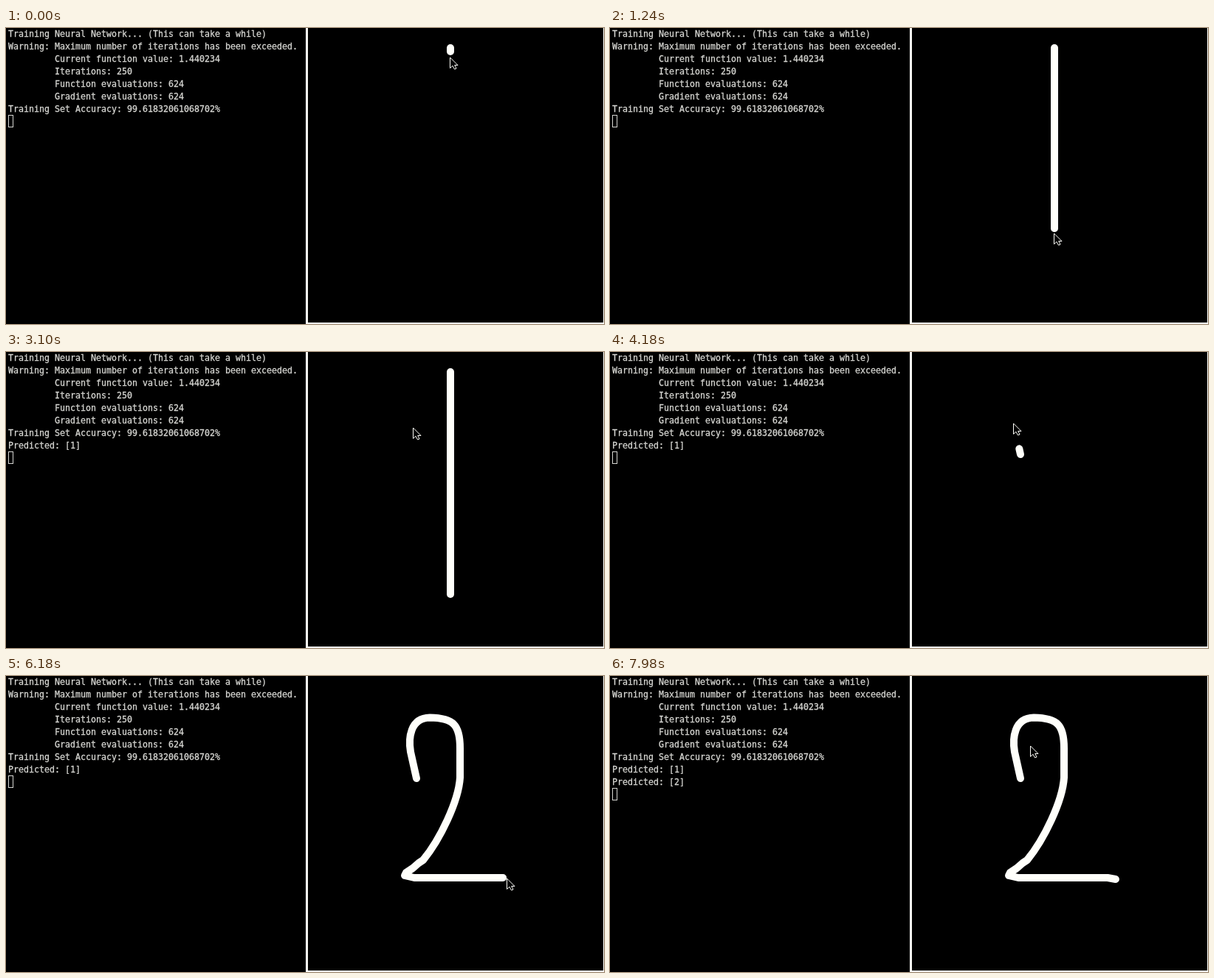
Write an HTML page with a canvas that moves like this. It is 810x402 px and loops after 8 s.

```html
<!DOCTYPE html>
<html lang="en">
<head>
<meta charset="utf-8">
<title>Digit recognition</title>
<style>
html, body { margin: 0; width: 100%; height: 100%; overflow: hidden; background: #000; }
canvas { display: block; }
</style>
</head>
<body>
<canvas id="stage" width="810" height="402"></canvas>
<script>
const LOOP = 8000;
const WHITE = '#fffffa', GREY = '#d6d6d2';
const ctx = document.getElementById('stage').getContext('2d');

const LOG = [
  'Training Neural Network... (This can take a while)',
  'Warning: Maximum number of iterations has been exceeded.',
  '         Current function value: 1.440234',
  '         Iterations: 250',
  '         Function evaluations: 624',
  '         Gradient evaluations: 624',
  'Training Set Accuracy: 99.61832061068702%'
];
const PREDICTIONS = [[2000, 'Predicted: [1]'], [6860, 'Predicted: [2]']];

const ONE = 'M602 27V329';
const TWO = 'M556 139L548 103C545 85 547 57 574 56.5C606 57 615 66 615 98V138' +
  'C613 170 588 222 565 250L559 254L551 261L542 267L540 271L553 274H674L685 276';

// A move follows a path; pace lists [time, distance travelled].
function move(d, pace, ink) {
  const line = document.createElementNS('http://www.w3.org/2000/svg', 'path');
  line.setAttribute('d', d);
  return { line, shape: new Path2D(d), pace, start: pace[0][0], ...ink };
}

// Ink trails the pointer by lag and stays until clear.
const MOVES = [
  move(ONE, [[-100, 0], [0, 12], [820, 204], [1680, 302]], { lag: 60, clear: 3600 }),
  move('M602 329L590 316L552.5 102', [[2440, 0], [2960, 235]]),
  move('M552.5 102L556 139', [[3700, 0], [4010, 37]]),
  move(TWO, [[4010, 0], [4180, 43], [5160, 257], [6040, 498], [6300, 510]], { lag: 140, clear: LOOP }),
  move('M685 276L697 273V260', [[6680, 0], [7020, 26]]),
  move('M697 260L570.5 94', [[7160, 0], [7980, 209]])
];

function distance(pace, t) {
  const i = pace.findIndex(key => key[0] > t);
  if (i < 0) return pace[pace.length - 1][1];
  if (i === 0) return 0;
  const [t0, d0] = pace[i - 1], [t1, d1] = pace[i];
  return d0 + (d1 - d0) * (t - t0) / (t1 - t0);
}

function drawTerminal(t) {
  const lines = LOG.concat(PREDICTIONS.filter(p => t >= p[0]).map(p => p[1]));
  ctx.font = '11.63px "DejaVu Sans Mono", monospace';
  ctx.fillStyle = ctx.strokeStyle = GREY;
  ctx.lineWidth = 0.3;
  lines.forEach((line, i) => {
    ctx.fillText(line, 3, 12 + 17 * i);
    ctx.strokeText(line, 3, 12 + 17 * i);
  });
  ctx.lineWidth = 1;
  ctx.strokeRect(3.5, 17 * lines.length - 0.5, 6, 16);
}

function drawPanel() {
  ctx.fillStyle = WHITE;
  ctx.fillRect(406, 0, 404, 402);
  ctx.fillStyle = '#000';
  ctx.fillRect(409, 0, 400, 400);
}

function drawInk({ shape, pace, start, lag, clear }, t) {
  if (!lag || t - lag < start || t >= clear) return;
  ctx.save();
  ctx.strokeStyle = WHITE;
  ctx.lineWidth = 10;
  ctx.lineCap = ctx.lineJoin = 'round';
  ctx.setLineDash([distance(pace, t - lag), 1000]);
  ctx.stroke(shape);
  ctx.restore();
}

const ARROW = new Path2D('M0 0V14.5L3.5 11.3L6 16L8.5 15L6.2 10.5H10.5Z');
function drawPointer(t) {
  const { line, pace } = MOVES.filter(m => m.start <= t).pop();
  const { x, y } = line.getPointAtLength(distance(pace, t));
  ctx.save();
  ctx.translate(Math.floor(x) - 0.5, Math.floor(y) + 1);
  ctx.fillStyle = '#000';
  ctx.strokeStyle = WHITE;
  ctx.lineWidth = 1;
  ctx.fill(ARROW);
  ctx.stroke(ARROW);
  ctx.restore();
}

function frame(now) {
  const t = now % LOOP;
  ctx.fillStyle = '#000';
  ctx.fillRect(0, 0, 810, 402);
  drawTerminal(t);
  drawPanel();
  MOVES.forEach(m => drawInk(m, t));
  drawPointer(t);
  requestAnimationFrame(frame);
}
requestAnimationFrame(frame);
</script>
</body>
</html>
```
